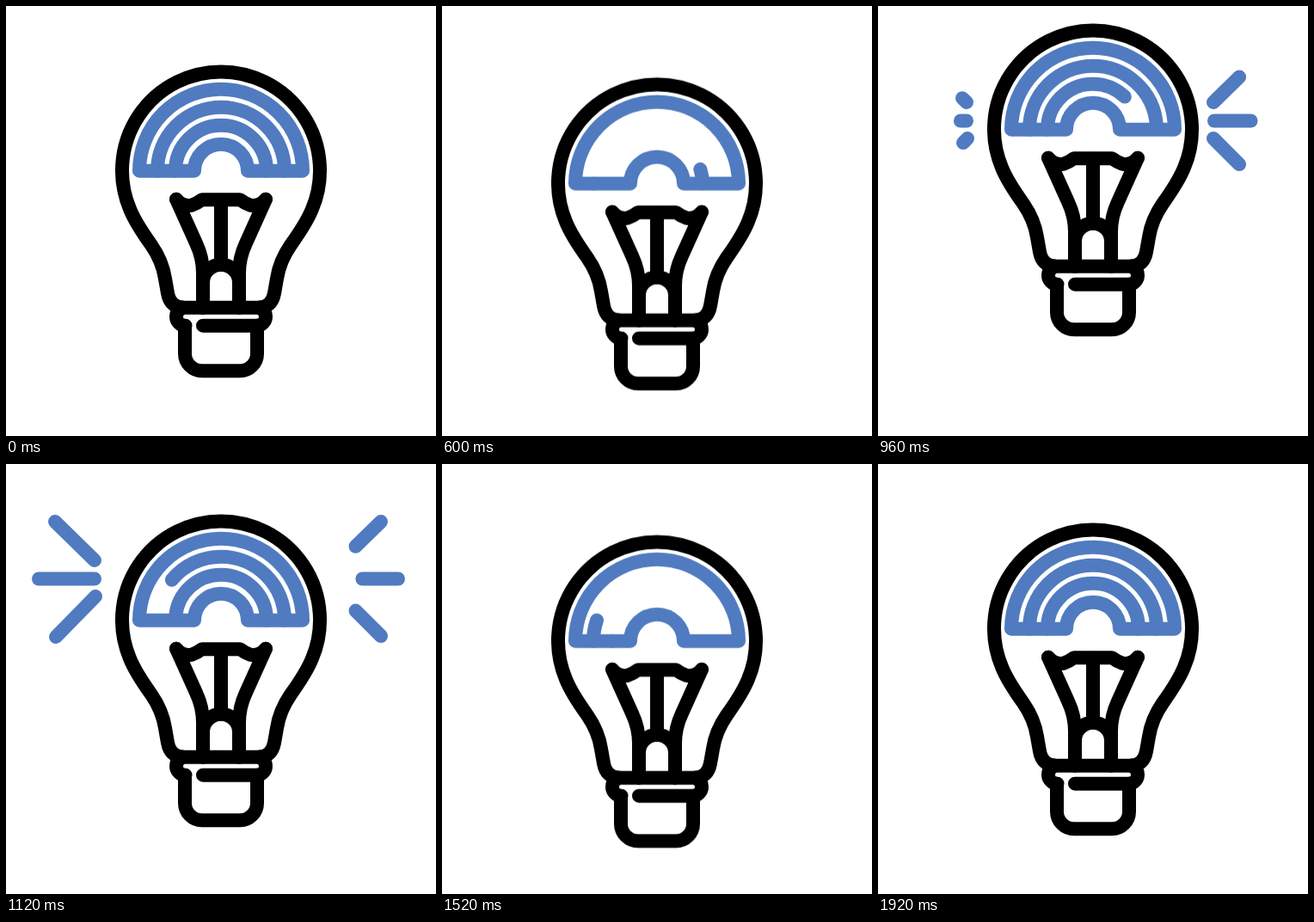
An HTML page for the animation above (2000 ms loop, 500 by 500 pixels).

```html
<!DOCTYPE html>
<html lang="en">
<head>
<meta charset="utf-8">
<title>Light bulb</title>
<style>
  html, body { margin: 0; width: 100%; height: 100%; overflow: hidden; background: #fff; }
  svg { display: block; width: 100%; height: 100%; }
  path { fill: none; stroke-width: 16; stroke-linecap: round; stroke-linejoin: round; }
  .glass path { stroke: #000; }
  .rainbow path, .rays path { stroke: #507bc0; }

  .bulb, .trim {
    animation: 2s cubic-bezier(.33333, 0, .66667, 1) infinite;
  }
  .trim { stroke-dasharray: 100 300; }
  .bulb { animation-name: bounce; }
  .wide { animation-name: wide; }
  .narrow { animation-name: narrow; }
  .right { animation-name: right; }
  .left { animation-name: left; }

  @keyframes bounce {
    0%, 10% { transform: translateY(0); }
    23.5% { transform: translateY(31px); }
    46.25% { transform: translateY(-50px); }
    66% { transform: translateY(31px); }
    85%, 100% { transform: translateY(0); }
  }

  /* Offset 100 is undrawn, 0 is whole, -100 is erased from the start. */
  @keyframes wide {
    0%, 10% { stroke-dashoffset: 0; }
    30% { stroke-dashoffset: -100; animation-timing-function: step-end; }
    30.01% { stroke-dashoffset: 100; }
    50% { stroke-dashoffset: 0; }
    70% { stroke-dashoffset: -100; animation-timing-function: step-end; }
    72% { stroke-dashoffset: 100; }
    92%, 100% { stroke-dashoffset: 0; }
  }
  @keyframes narrow {
    0%, 14% { stroke-dashoffset: 0; }
    34% { stroke-dashoffset: -100; animation-timing-function: step-end; }
    36% { stroke-dashoffset: 100; }
    54% { stroke-dashoffset: 0; }
    74% { stroke-dashoffset: -100; animation-timing-function: step-end; }
    76% { stroke-dashoffset: 100; }
    96%, 100% { stroke-dashoffset: 0; }
  }
  @keyframes right {
    0% { stroke-dashoffset: 200; animation-timing-function: step-end; }
    42.01% { stroke-dashoffset: 100; }
    52% { stroke-dashoffset: 0; }
    61.99% { stroke-dashoffset: -100; animation-timing-function: step-end; }
    62%, 100% { stroke-dashoffset: -200; }
  }
  @keyframes left {
    0% { stroke-dashoffset: 200; animation-timing-function: step-end; }
    46.01% { stroke-dashoffset: 100; }
    56% { stroke-dashoffset: 0; }
    65.99% { stroke-dashoffset: -100; animation-timing-function: step-end; }
    66%, 100% { stroke-dashoffset: -200; }
  }
</style>
</head>
<body>
<svg viewBox="0 0 500 500">
  <g class="bulb">
    <g class="glass">
      <path d="M206 350.5Q191 350 188 334L185 317C183 304 178 291 169 278C159 264 150 251 144 236A115 115 0 1 1 356 236C350 251 341 264 331 278C322 291 317 304 315 317L312 334Q309 350 294 350.5"/>
      <g transform="translate(0 .7)">
        <!-- filament -->
        <path d="M198 224Q206 233 216 231Q222 229 228 224.5H272Q278 229 284 231Q294 233 302 224"/>
        <path d="M198 224L221 275Q229 292 229 310V350M302 224L279 275Q271 292 271 310V350"/>
        <path d="M250 225V300"/>
        <path d="M229 350V321A21 21 0 0 1 271 321V350"/>
        <!-- socket -->
        <path d="M208.5 371A10.5 10.5 0 0 1 208.5 350H291.5A10.5 10.5 0 0 1 291.5 371H229"/>
        <path d="M208 371V403.5A20 20 0 0 0 228 423.5H272A20 20 0 0 0 292 403.5V371"/>
      </g>
    </g>
    <g class="rainbow" transform="translate(0 .7)">
      <path d="M155 191A95 95 0 0 1 345 191H281A31 31 0 0 0 219 191Z"/>
      <path class="trim wide" pathLength="100" d="M176 191A74 74 0 0 1 324 191"/>
      <path class="trim narrow" pathLength="100" d="M197 191A53 53 0 0 1 303 191"/>
    </g>
  </g>
  <g class="rays">
    <path class="trim right" pathLength="100" d="M390 112L436 67"/>
    <path class="trim right" pathLength="100" d="M391 133.5H456"/>
    <path class="trim right" pathLength="100" d="M390 154L436 200"/>
    <path class="trim left" pathLength="100" d="M103 112L57 67"/>
    <path class="trim left" pathLength="100" d="M103 133.5H38"/>
    <path class="trim left" pathLength="100" d="M104 154L58 201"/>
  </g>
</svg>
</body>
</html>
```
